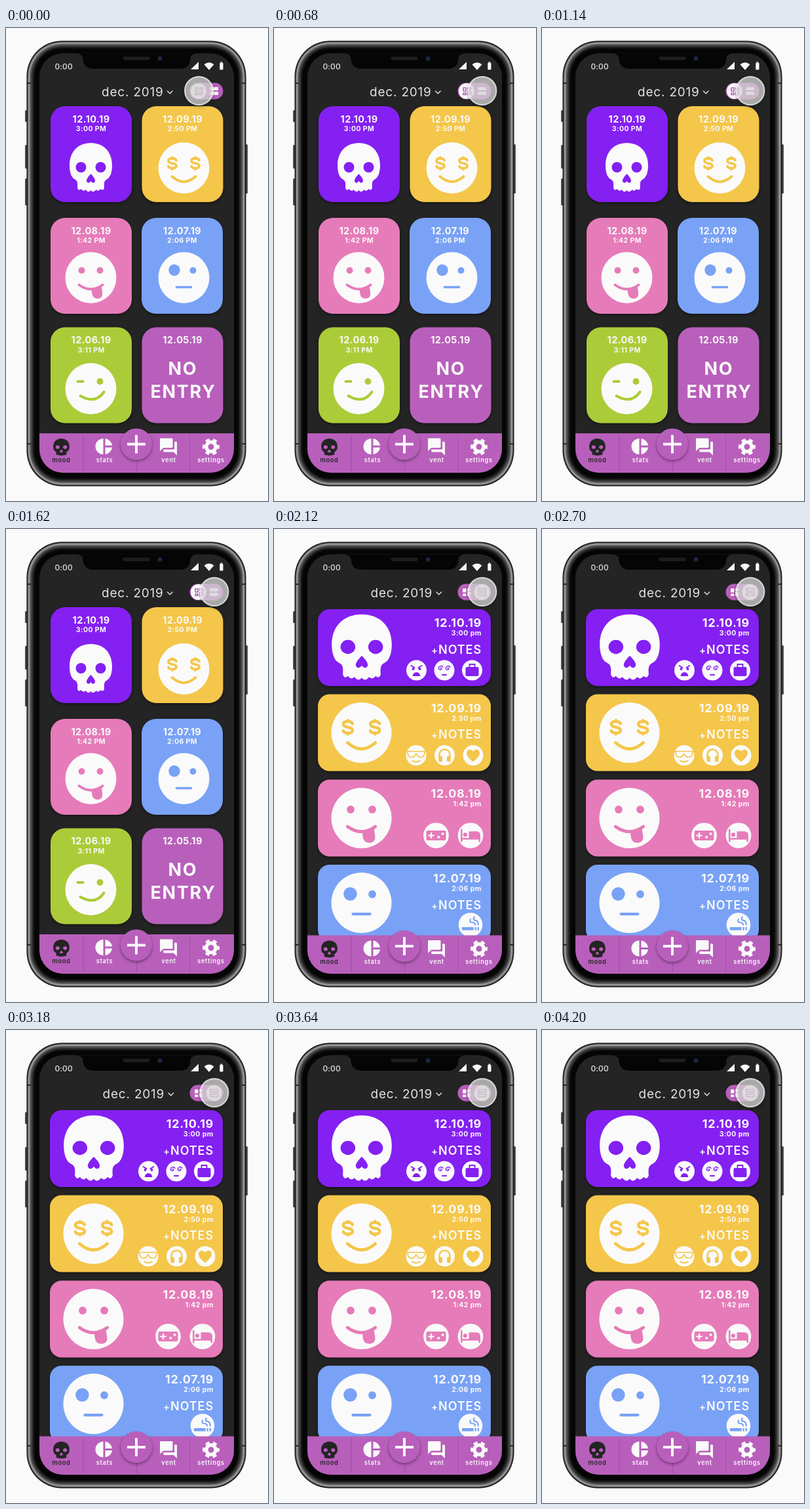
An HTML page for the animation above (4220 ms loop, 400 by 720 pixels).

```html
<!DOCTYPE html>
<html lang="en">
<head>
<meta charset="utf-8">
<title>Mood journal</title>
<style>
html, body { margin: 0; width: 100%; height: 100%; overflow: hidden; background: #fafafa; }
svg { display: block; width: 400px; height: 720px; font-family: Inter, "Open Sans", sans-serif; }
.card { filter: drop-shadow(0 2px 2px rgba(0,0,0,.4)); }
</style>
</head>
<body>
<svg id="stage" viewBox="0 0 400 720"></svg>
<script>
const LOOP = 4220;
const WHITE = '#fafafa', DARK = '#242424', ORCHID = '#b85fbb', VIOLET = '#8420f2', YELLOW = '#f4c64a',
  PINK = '#e67bb9', BLUE = '#79a2f6', GREEN = '#accb38';

const at = (x, y, body, sx = 1, sy = sx) => `<g transform="translate(${x} ${y}) scale(${sx} ${sy})">${body}</g>`;
const dot = (x, y, r, fill = WHITE) => `<circle cx="${x}" cy="${y}" r="${r}" fill="${fill}"/>`;
const box = (x, y, w, h, r, fill = WHITE, more = '') =>
  `<rect x="${x}" y="${y}" width="${w}" height="${h}" rx="${r}" fill="${fill}" ${more}/>`;
const shape = (d, fill = WHITE) => `<path d="${d}" fill="${fill}"/>`;
const line = (d, color = WHITE, width = 4) =>
  `<path d="${d}" fill="none" stroke="${color}" stroke-width="${width}" stroke-linecap="round" stroke-linejoin="round"/>`;
const text = (x, y, s, size, { anchor = 'middle', weight = 700, gap = .4, fill = WHITE } = {}) =>
  `<text x="${x}" y="${y}" font-size="${size}" text-anchor="${anchor}" font-weight="${weight}" letter-spacing="${gap}" fill="${fill}">${s}</text>`;

// Mood faces, drawn around their centre with radius 39
const skull = (hole, bone = WHITE) => shape(
  'M0-37C20-37 32.5-23 32.5-3C32.5 7 30 15 25 18C20 20 20 25 20.500 31Q19 37 15 33' +
  'Q11 38 8 34Q4 40 0 35Q-4 40-8 34Q-11 38-15 33Q-19 37-20.500 31C-20 25-20 20-25 18' +
  'C-30 15-32.5 7-32.5-3C-32.5-23-20-37 0-37Z', bone) +
  dot(-15, 0, 8, hole) + dot(15, 0, 8, hole) +
  shape('M0 10C3 13 7 18 6.500 21C5 25 2 24 0 21C-2 24-5 25-6.500 21C-7 18-3 13 0 10Z', hole);
const face = features => c => dot(0, 0, 39) + features(c);
const dollar = 'M6-4.500Q5-7.500 0-7.500Q-6-7.500-6-4Q-6-1 0 0Q6 1 6 4Q6 7.500 0 7.500Q-5 7.500-6 4.500M0-9V-7.500M0 7.500V9';
const money = face(c => at(-17.5, -7, line(dollar, c, 3.8)) + at(17.5, -7, line(dollar, c, 3.8)) +
  line('M-18 13Q0 29 18 13', c));
const tongue = face(c => dot(-14, -11, 5, c) + dot(14, -11, 5, c) + line('M-18 11Q0 24 18 11', c) +
  shape('M1 18Q10 17 16 12L17.500 22Q19 31 11 32Q3 32 2 25Z', c));
const puzzled = face(c => dot(-14.5, -11.5, 8.7, c) + dot(14, -11, 5, c) + line('M-11 14.5H11', c, 3.6));
const wink = face(c => line('M-20-11H-12', c) + dot(14, -11, 5, c) + line('M-16 11Q7 24 20 5', c));

// Note badges, radius 15.5
const badge = body => c => dot(0, 0, 15.5) + body(c);
const angry = badge(c => line('M-8-7L-3-4M8-7L3-4', c, 2) + dot(-5, -2, 2, c) + dot(5, -2, 2, c) +
  shape('M-6 9Q-5 3 0 3Q5 3 6 9Z', c));
const spiral = 'm0 0a1.200 1.200 0 0 1 2 1a2.500 2.500 0 0 1-4.500 0a3.500 3.500 0 0 1 6.500-2.500';
const dizzy = badge(c => line('M-6-3' + spiral + 'M5-3' + spiral, c, 1.4) + line('M-3 7H3', c, 2));
const briefcase = badge(c => box(-10, -5, 20, 14, 2, c) + line('M-4-6V-9H4V-6', c, 2));
const shades = badge(c => line('M-15-6H15M-13-5Q-13 3-7 3Q-2 3-1-2H1Q2 3 7 3Q13 3 13-5', c, 1.7) +
  line('M-6 8Q0 12 6 8', c, 1.8));
const phones = badge(c => line('M-8 5V-1A8 8 0 0 1 8-1V5', c, 2.4) + box(-9, 1, 5.5, 9, 1.5, c) + box(3.5, 1, 5.5, 9, 1.5, c));
const heart = badge(c => shape('M0 10C-6 5-10 1-10-3.500C-10-9-3-11 0-5.500C3-11 10-9 10-3.500C10 1 6 5 0 10Z', c));
const gamepad = badge(c => box(-12, -6, 24, 12, 2, c) + line('M-9 0H-3M-6-3V3', WHITE, 1.8) +
  dot(3, 2, 1.6) + dot(8, -2, 1.6));
const bed = badge(c => line('M-11-7V7M-11 4H11V7', c, 2) + dot(-6.500, -1, 2.5, c) +
  shape('M-2-5H7Q12-5 12 0V4H-2Z', c));
const smoke = badge(c => box(-11, 3, 15, 4, 0, c) + box(5.5, 3, 2, 4, 0, c) + box(9, 3, 2, 4, 0, c) +
  line('M6 0Q6-3 2-3Q-2-4 0-7M10 0Q10-6 5-6Q3-8 5-10', c, 1.8));

const heading = x => text(x, 103.5, 'dec. 2019', 19, { anchor: 'start', weight: 400, gap: .8, fill: '#e4e4e4' }) +
  line(`M${x + 100.5} 96l3.800 3.800l3.800-3.800`, '#e4e4e4', 1.4);

// The chosen view's icon is outlined on the thumb, the other one is solid
function toggle(list) {
  const icon = (d, on) => on ? line(d, ORCHID, 1.6) : shape(d) + line(d, WHITE, 1);
  return box(280.5, 83.5, 51, 25, 12.5, ORCHID) + dot(list ? 317.5 : 294, 96, 12) +
    icon('M289 91h4v5h-4zM289 99h4v2.500h-4zM296 96.500h4v5h-4zM296 91h4v2.500h-4z', !list) +
    icon('M312 90.500h11.500v4h-11.500zM312 97.500h11.500v4h-11.500z', list);
}

function tile(x, y, color, date, time, mood) {
  const cx = x + 62;
  return box(x, y, 124, 146, 22, color, 'class="card"') +
    text(cx, y + 24.5, date, 14.5) + (time ? text(cx, y + 38, time, 10.5) : '') + mood;
}
const gridView = heading(146) + toggle(false) +
  tile(68, 119, VIOLET, '12.10.19', '3:00 PM', at(129.5, 212, skull(VIOLET))) +
  tile(207.5, 119, YELLOW, '12.09.19', '2:50 PM', at(271.5, 213, money(YELLOW))) +
  tile(68, 289, PINK, '12.08.19', '1:42 PM', at(129.5, 380, tongue(PINK))) +
  tile(207, 289, BLUE, '12.07.19', '2:06 PM', at(271.5, 380, puzzled(BLUE))) +
  tile(68, 455.5, GREEN, '12.06.19', '3:11 PM', at(129.5, 549, wink(GREEN))) +
  tile(207.5, 455.5, ORCHID, '12.05.19', '',
    text(270, 527.5, 'NO', 27, { gap: 1.7 }) + text(270.5, 562.5, 'ENTRY', 27, { gap: 1.7 }));

function row(y, color, date, time, notes, mood, badges) {
  const end = { anchor: 'end' };
  return box(67, y, 264, 117, 18, color, 'class="card"') + mood +
    text(317, y + 27, date, 18, { ...end, gap: .7 }) + text(316.7, y + 40, time, 10.5, end) +
    (notes ? text(317, y + 67.5, '<tspan font-size="15">+</tspan>NOTES', 18, { ...end, weight: 600, gap: .9 }) : '') +
    badges.map(([x, dy, icon, k = 1]) => at(x, y + dy, icon(color), k)).join('');
}
const listView = heading(147.5) + toggle(true) +
  row(122, VIOLET, '12.10.19', '3:00 pm', true, at(134, 179.5, skull(VIOLET), 1.41, 1.34),
    [[217.5, 93, angry], [260, 93, dizzy], [302.5, 93, briefcase]]) +
  row(251.5, YELLOW, '12.09.19', '2:50 pm', true, at(133.5, 310, money(YELLOW), 1.18),
    [[217, 93, shades], [260.5, 93, phones], [304, 93, heart]]) +
  row(381.5, PINK, '12.08.19', '1:42 pm', false, at(133.5, 440, tongue(PINK), 1.18),
    [[247.5, 85, gamepad, 1.25], [300, 85, bed, 1.25]]) +
  row(511, BLUE, '12.07.19', '2:06 pm', true, at(133.5, 569, puzzled(BLUE), 1.18),
    [[300, 91.5, smoke, 1.18]]);

const label = (x, s, fill = WHITE) => text(x, 660.5, s, 9.2, { weight: 600, gap: .75, fill });
const nav = box(51, 617, 297, 62, 0, ORCHID) +
  line('M118 620V674M199.500 657V674M280.500 620V674', '#a14fa5', 1) +
  at(84.5, 638, skull(DARK === '' ? '' : ORCHID, DARK), .38, .35) + label(84.5, 'mood', DARK) +
  shape('M148.500 625A12 12 0 0 0 148.500 649ZM151.500 625A12 12 0 0 1 162 635.500H151.500ZM151.500 638.500H162A12 12 0 0 1 151.500 649Z') +
  label(150.5, 'stats') +
  at(232.4, 622, shape('M21 6h-2v9H6v2c0 .55.45 1 1 1h11l4 4V7c0-.55-.45-1-1-1zM17 12V3c0-.55-.45-1-1-1H3c-.55 0-1 .45-1 1v14l4-4h10c.55 0 1-.45 1-1z'), 1.3) +
  label(248.5, 'vent') +
  at(313, 637.5, `<g fill="none" stroke="${WHITE}"><circle r="7.200" stroke-width="5.500"/>
    <circle r="11" stroke-width="4" stroke-dasharray="6 5.520" stroke-dashoffset="3"/></g>`) +
  label(313, 'settings') +
  `<circle cx="199" cy="633.500" r="24" fill="${ORCHID}" class="card"/>` +
  `<path d="M185 633.500H213M199 619.500V647.500" stroke="${WHITE}" stroke-width="4"/>`;

// The metal rim is a stack of inset rounded plates: [inset, colour]
const rim = [[0, '#141414'], [1.5, '#6a6a6a'], [3, '#a2a2a2'], [4.5, '#6c6c6c'], [6, '#484848'],
  [8, '#2c2c2c'], [10, '#141414'], [12, '#050505']]
  .map(([d, color]) => box(31.5 + d, 19.5 + d, 335 - 2 * d, 678 - 2 * d, 54 - d, color)).join('');
const phone = [[125, 18], [178, 36], [229, 41]].map(([y, h]) => box(29, y, 4, h, 1.5, '#4a4a4a')).join('') +
  box(365, 177, 4, 75, 1.5, '#4a4a4a') + rim +
  line('M32.500 84H37M361 84H365.500M32.500 633H37M361 633H365.500', '#262626', 2);

const status = shape('M108 38.500Q117 40 117.500 46Q118 62 134 62H265Q281 62 281.500 46Q282 40 291 38.500Z', '#050505') +
  box(178.5, 43.5, 41, 5.5, 2.7, '#1d1d1d') + dot(235, 46.5, 4, '#151a2c') + dot(235, 46.5, 1.6, '#263a70') +
  text(74.5, 63, '0:00', 12, { anchor: 'start', weight: 500, gap: .1, fill: '#e4e4e4' }) +
  shape('M294 51.500V63H282ZM302.500 55.500Q310 49.500 317.500 55.500L310 64Z') +
  box(326.3, 53, 5.2, 10.5, .8) + box(327.7, 51.5, 2.4, 2, 0);

document.getElementById('stage').innerHTML = `
  <defs><clipPath id="screen">${box(51, 38.5, 297, 638.5, 36)}</clipPath></defs>
  ${phone}
  <g clip-path="url(#screen)">
    ${box(51, 38, 297, 640, 0, DARK)}${gridView}
    <g id="list">${box(51, 38, 297, 640, 0, DARK)}${listView}</g>
    <g id="nav">${nav}</g>
  </g>
  ${status}
  <circle id="ripple" cx="318" cy="95.500" fill="#e6e6e6"/>
  <circle id="cursor" cy="95.500" r="21.500" fill="#eee" fill-opacity=".68" stroke="${WHITE}" stroke-opacity=".75" stroke-width="2" class="card"/>`;

const [list, bar, ripple, cursor] = ['list', 'nav', 'ripple', 'cursor'].map(id => document.getElementById(id));
const set = (el, name, value) => el.setAttribute(name, value);
const progress = (t, from, to) => Math.min(1, Math.max(0, (t - from) / (to - from)));
const ease = p => (1 - Math.cos(Math.PI * p)) / 2;

function draw(t) {
  const shown = progress(t, 1780, 1960);
  const tap = progress(t, 1690, 2080);
  set(cursor, 'cx', 294.5 + 23.5 * ease(progress(t, 60, 650)));
  set(ripple, 'r', 21 + 41 * (1 - (1 - tap) ** 2));
  set(ripple, 'opacity', tap > 0 ? .5 * (1 - tap) : 0);
  set(list, 'opacity', shown);
  set(bar, 'transform', `translate(0 ${1.5 * shown})`);
}

const start = performance.now();
function tick() {
  draw((performance.now() - start) % LOOP);
  requestAnimationFrame(tick);
}
tick();
</script>
</body>
</html>
```
